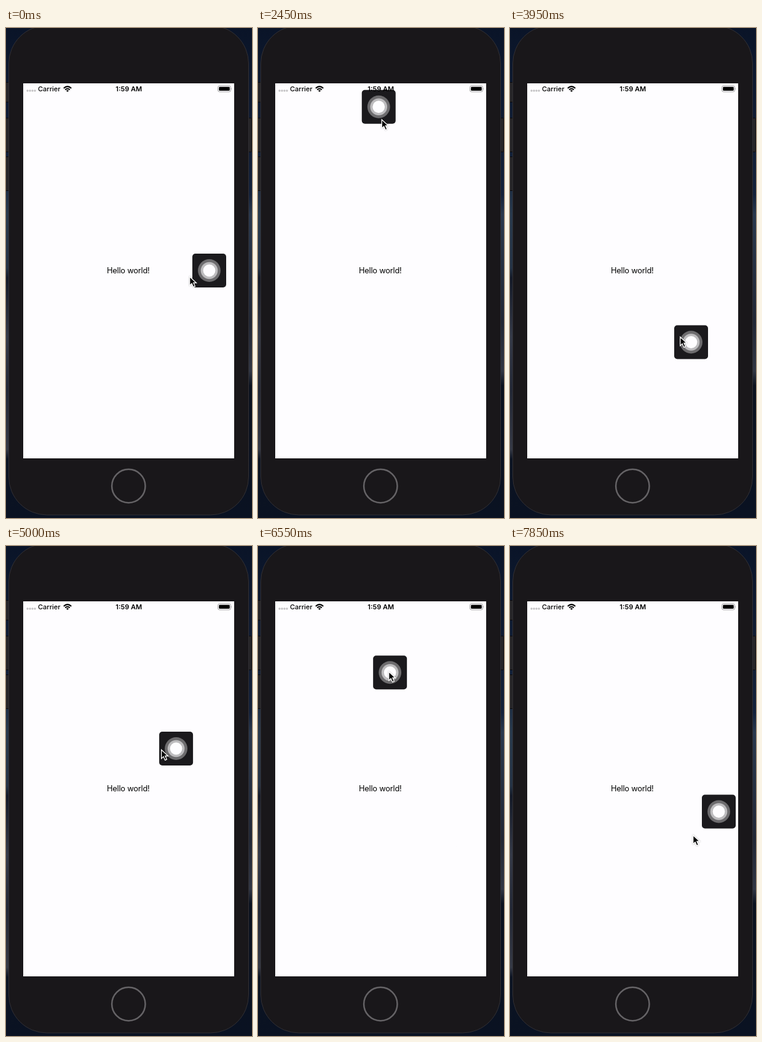
These frames come from a looping animation (400 px wide and 797 px high, 8 s). An HTML page:

```html
<!DOCTYPE html>
<html lang="en">
<head>
<meta charset="utf-8">
<title>Floating button</title>
<style>
  html, body { margin: 0; width: 100%; height: 100%; overflow: hidden; background: #0a1326; }
  svg { display: block; width: 100vw; height: 100vh; }
  text { font-family: Inter, Roboto, sans-serif; fill: #000; }
  .status { font-size: 11px; font-weight: 500; }
  .clock { font-weight: 600; }
  #cursor { filter: drop-shadow(0 .8px .8px rgba(0, 0, 0, .3)); }
</style>
</head>
<body>
<svg viewBox="0 0 400 797">
  <defs>
    <linearGradient id="leftSky" x2="0" y2="1">
      <stop offset="0" stop-color="#0a1428"/>
      <stop offset=".27" stop-color="#12213a"/>
      <stop offset=".38" stop-color="#293a4d"/>
      <stop offset=".49" stop-color="#253345"/>
      <stop offset=".51" stop-color="#141a28"/>
      <stop offset=".63" stop-color="#353a48"/>
      <stop offset=".74" stop-color="#232836"/>
      <stop offset=".86" stop-color="#353945"/>
      <stop offset=".88" stop-color="#0b1322"/>
      <stop offset="1" stop-color="#0a1222"/>
    </linearGradient>
    <linearGradient id="rightSky" x2="0" y2="1">
      <stop offset="0" stop-color="#0a1428"/>
      <stop offset=".34" stop-color="#13213a"/>
      <stop offset=".38" stop-color="#29384d"/>
      <stop offset=".6" stop-color="#212735"/>
      <stop offset=".7" stop-color="#313643"/>
      <stop offset=".73" stop-color="#0a111e"/>
      <stop offset="1" stop-color="#0a1222"/>
    </linearGradient>
  </defs>

  <rect width="200" height="797" fill="url(#leftSky)"/>
  <rect x="200" width="200" height="797" fill="url(#rightSky)"/>
  <g fill="#262528" stroke="#0c0b0d">
    <rect x="-4" y="88.500" width="10" height="32" rx="1"/>
    <rect x="-4" y="146.500" width="10" height="55" rx="1"/>
    <rect x="-4" y="209.500" width="10" height="55" rx="1"/>
    <rect x="393" y="146.500" width="6.500" height="55" rx="1"/>
  </g>
  <rect x="4.500" y="-4" width="390" height="796" rx="62" fill="#19171a" stroke="#323034"/>
  <circle cx="199.300" cy="745" r="27.200" fill="none" stroke="#656366" stroke-width="2.500"/>
  <rect x="28" y="90" width="343" height="610" fill="#fefdff"/>
  <text x="198.800" y="399" font-size="12.800" letter-spacing="-.2" text-anchor="middle">Hello world!</text>

  <g id="button">
    <rect width="55" height="55" rx="5" fill="#1b1a1d"/>
    <circle cx="27.500" cy="27.500" r="18.400" fill="#6d6c6e"/>
    <circle cx="27.500" cy="27.500" r="13.800" fill="#bdbcbe"/>
    <circle cx="27.500" cy="27.500" r="9.900" fill="#fefdff"/>
  </g>

  <path d="M35 102h12.100" stroke="#c3c2c4" stroke-width="3.400" stroke-linecap="round" stroke-dasharray="0 4"/>
  <text class="status" x="52" y="102.800">Carrier</text>
  <text class="status clock" x="199.800" y="102.800" text-anchor="middle">1:59 AM</text>
  <g fill="none" stroke="#000" stroke-width="2">
    <path d="M93.800 98Q100 92.200 106.200 98"/>
    <path d="M96.200 100.500Q100 97 103.800 100.500"/>
  </g>
  <path d="M97.900 101.900Q100 100.300 102.100 101.900L100 104Z"/>
  <rect x="344.500" y="94" width="21" height="9.800" rx="2.700" fill="none" stroke="#a3a2a4"/>
  <rect x="346.200" y="95.700" width="17.600" height="6.400" rx="1.400"/>
  <path d="M366.400 97.200q1.300 1.700 0 3.400z" fill="#a3a2a4"/>

  <g id="cursor">
    <path d="M.7 .6V14.700L4.100 11.600L6.700 17.400L9.400 16.200L6.900 10.500H11.500Z"
          fill="#000" stroke="#fff" stroke-width="1.300"/>
  </g>
</svg>

<script>
const LOOP = 8000, TICK = 50;
const LAG = 15; // the button trails the pointer by this many ms

const LEFT = 32.5, RIGHT = 312, TOP = 96.5;
const START = { cursor: [298, 404], button: [303, 367] };

const hover = (start, end, ...to) => ({ start, end, to });
const pull = (start, end, ...to) => ({ start, end, to, drag: true });
// A drop drags too, then snaps the button to its resting place on an edge.
const drop = (start, end, to, rest) => ({ start, end, to, rest, drag: true });

const gestures = [
  pull(0, 150, 241, 388),
  drop(300, 350, [166, 394], [LEFT, 350.5]),
  hover(600, 1150, 69, 376),
  drop(1250, 1750, [205, 189], [168.5, TOP]),
  hover(1950, 2200, 200, 140),
  drop(2400, 3000, [228, 571], [RIGHT, 524]),
  hover(3250, 3650, 326, 547),
  pull(3800, 3950, 276, 502),
  drop(3950, 4250, [237, 325], [RIGHT, 302]),
  hover(4450, 4800, 326, 331),
  pull(4900, 5000, 252, 331),
  drop(5000, 5400, [132, 331], [LEFT, 301]),
  hover(5650, 5950, 52, 331),
  pull(6100, 6550, 212, 204),
  drop(6550, 6600, [219, 191], [194, TOP]),
  hover(6850, 7200, 227, 136),
  drop(7400, 7850, [297, 470], [RIGHT, 404.5])
];

const linear = u => u;
const easeOut = u => u * (2 - u);
const easeInOut = u => u * u * (3 - 2 * u);
const clamp = u => Math.min(1, Math.max(0, u));

function poseAt(time) {
  let { cursor, button } = START;
  let pulling = false;
  for (const { start, end, to, rest, drag } of gestures) {
    if (time < start) break;
    const isPull = drag && !rest;
    const ease = isPull ? linear : pulling ? easeOut : easeInOut;
    const progress = t => ease(clamp((t - start) / (end - start)));
    const shift = (point, k) => point.map((v, i) => v + (to[i] - cursor[i]) * k);

    if (rest && time >= end) button = rest;
    else if (drag) button = shift(button, progress(time - LAG));
    cursor = shift(cursor, progress(time));
    pulling = isPull;
  }
  return { cursor, button };
}

const origin = performance.now();

function draw(now) {
  const elapsed = Math.max(0, now - origin) % LOOP;
  const pose = poseAt(Math.floor(elapsed / TICK) * TICK);
  for (const id in pose)
    document.getElementById(id).setAttribute('transform', `translate(${pose[id]})`);
  requestAnimationFrame(draw);
}
draw(origin);
</script>
</body>
</html>
```
